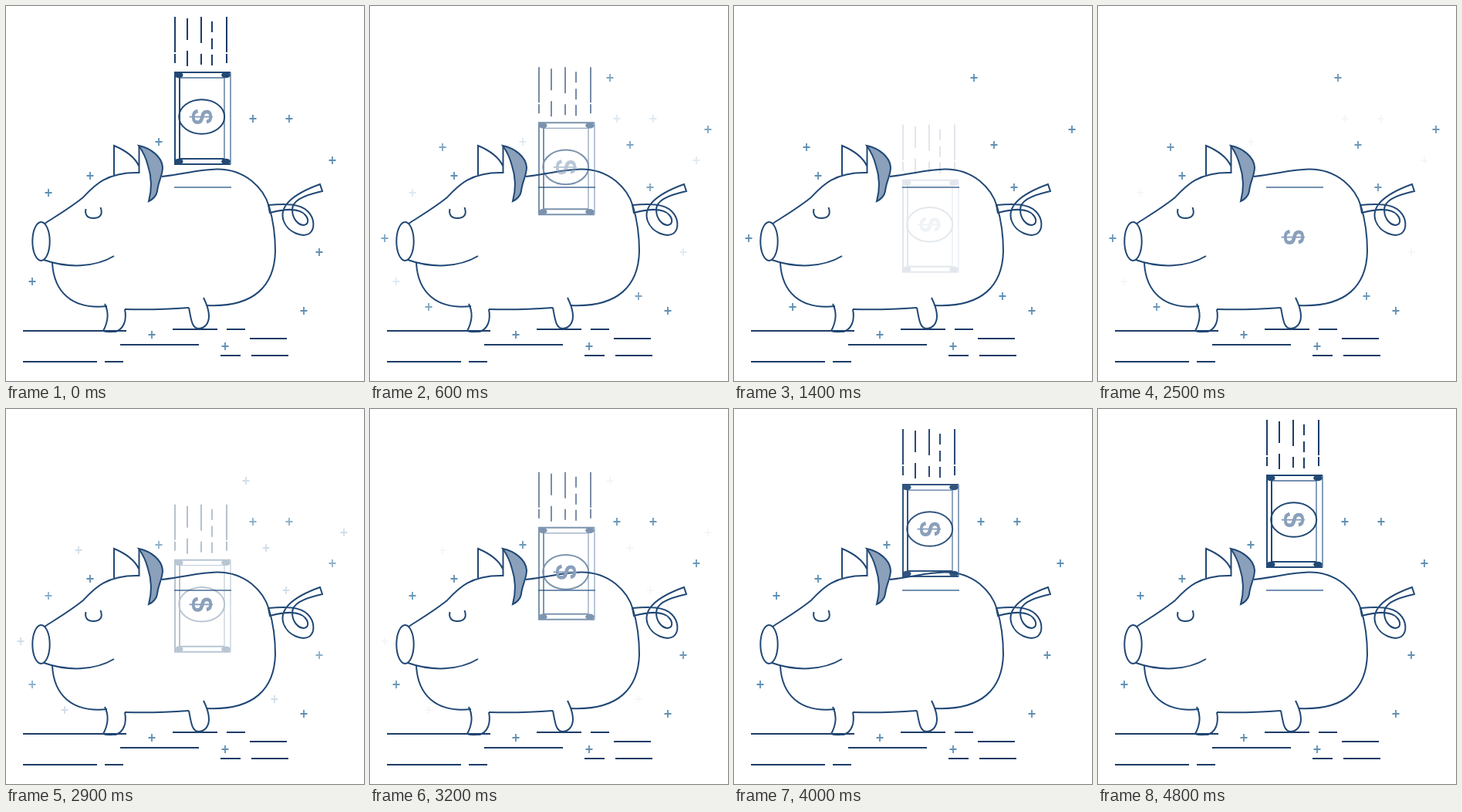
These frames come from a looping animation (464x486 px, 5 s). An HTML page:

```html
<!DOCTYPE html>
<html lang="en">
<head>
<meta charset="utf-8">
<title>Piggy bank</title>
<style>
  html, body { margin: 0; width: 100%; height: 100%; overflow: hidden; background: #fff; }
  svg { display: block; width: 464px; height: 486px; }
  .ink { fill: none; stroke: #214875; stroke-width: 2; }
  .thin { stroke-width: 1.3; }
  .cross { fill: none; stroke: #6090b4; stroke-width: 1.8; }
  .solid { fill: #214875; stroke: none; }
  .pale { fill: #8aa0bb; }
  text { font: bold 36px "Liberation Sans", Arial, sans-serif; text-anchor: middle; }
</style>
</head>
<body>
<svg viewBox="0 0 464 486">
  <g class="cross">
    <path id="steady"/>
    <path id="before"/>
    <path id="after"/>
  </g>

  <g class="ink">
    <path stroke="#1d3c68" d="M22 421H156M216 419H274M286 419H310M316 431H364M148 439H250M278 453H304M318 453H366M22 461H118M128 461H152"/>
    <!-- body -->
    <path d="M50 282C67 271 84 261 100 248C114 233 130 215 172 216
      M202 221C235 217 250 212 273 211.5C310 211 334 236 341 260C347 280 349 300 349 318C348 362 322 391 260 388
      M237 391C210 393 185 394 154 393M131 389C85 394 62 370 60 333"/>
    <!-- legs -->
    <path d="M256 378C261 388 263 394 263 402C263 412 257 418 249 418C241 417 240 407 237 391
      M128 386C133 396 133 408 126 421C131 423 137 422 142 422C152 419 157 408 154 393"/>
    <!-- face -->
    <ellipse cx="45.5" cy="305" rx="11.2" ry="25"/>
    <path d="M49 329C80 340 115 339 140 324M103.500 263C102 270 105 275 113 275C122 275 126 270 122.500 261"/>
    <!-- ears -->
    <path d="M140 219V181C152 186 166 194 172 207M172.500 217V181"/>
    <path class="pale" d="M172 181C187 184 202 195 203 209C203 220 197 228 196 240C195 246 190 251 185 253C189 238 189 222 184 207C181 195 177 188 172 181Z"/>
    <!-- tail -->
    <path d="M340 258C362 256 381 256 391 266C400 275 401 289 393 295C384 300 366 294 360 279C353 260 371 244 407 231L410 240C383 246 371 253 371 264C371 276 379 284 386 284C392 283 393 277 388 271C380 261 362 263 342 268Z"/>
    <path class="thin" stroke="#466b96" d="M218 235H292"/>
  </g>

  <g id="bill">
    <g id="note" class="ink">
      <path stroke="#1d3c68" d="M219 14V60M219 62V74M235 16V44M235 58V78M253 14V48M253 62V76M267 20V34M267 42V56M267 63V77M286 14V60M286 62V74"/>
      <path d="M291 86H219V205H291M225 93V198H283"/>
      <path class="thin" stroke="#466b96" d="M291 86V205M283 93V198M225 93H283"/>
      <g class="solid">
        <ellipse cx="224" cy="89.5" rx="5.5" ry="3.8"/>
        <ellipse cx="285" cy="89.5" rx="5.8" ry="3.8"/>
        <ellipse cx="224" cy="201.5" rx="5.5" ry="3.8"/>
        <ellipse cx="285" cy="201.5" rx="5.8" ry="3.8"/>
      </g>
      <ellipse cx="253.700" cy="143.500" rx="29.5" ry="22.3"/>
    </g>
    <text id="dollar" class="pale" transform="translate(253.300 143.500) rotate(90)" y="12">$</text>
  </g>
</svg>
<script>
const LOOP = 5000, STEP = 100, HALF = 2400, FADE = 1200, DROP = 160;
const el = id => document.getElementById(id);

const crosses = points =>
  points.map(([x, y]) => `M${x - 4.5} ${y}h9M${x} ${y - 5}v10`).join("");

el("steady").setAttribute("d", crosses([[109, 220], [189, 426], [284, 441], [386, 395]]));
el("before").setAttribute("d", crosses([
  [198, 176], [320, 146], [367, 146], [423, 200], [55, 242], [406, 319], [34, 357]]));
el("after").setAttribute("d", crosses([
  [311, 93], [438, 160], [94, 183], [337, 180], [363, 235], [19, 301], [76, 390], [348, 376]]));

// cubic-bezier(.25, .1, .25, 1)
function ease(x) {
  if (x <= 0) return 0;
  if (x >= 1) return 1;
  const curve = (s, a, b) => 3 * s * (1 - s) * ((1 - s) * a + s * b) + s ** 3;
  let low = 0, high = 1;
  for (let i = 0; i < 24; i++) {
    const mid = (low + high) / 2;
    if (curve(mid, .25, .25) < x) low = mid; else high = mid;
  }
  return curve(low, .1, 1);
}

function draw(now) {
  const t = Math.floor(now % LOOP / STEP) * STEP;
  const rising = t > HALF;
  const since = rising ? t - HALF : t;
  const progress = duration => rising ? 1 - ease(since / duration) : ease(since / duration);

  const fall = progress(HALF), swap = progress(FADE);
  const opacity = fall > .97 ? 0 : 1 - fall;
  el("bill").setAttribute("transform", `translate(0 ${DROP * fall})`);
  el("note").setAttribute("opacity", opacity);
  el("dollar").setAttribute("opacity", rising ? 1 : opacity);
  el("before").setAttribute("opacity", 1 - swap);
  el("after").setAttribute("opacity", swap);
}

const start = performance.now();
function tick() {
  draw(performance.now() - start);
  requestAnimationFrame(tick);
}
tick();
</script>
</body>
</html>
```
